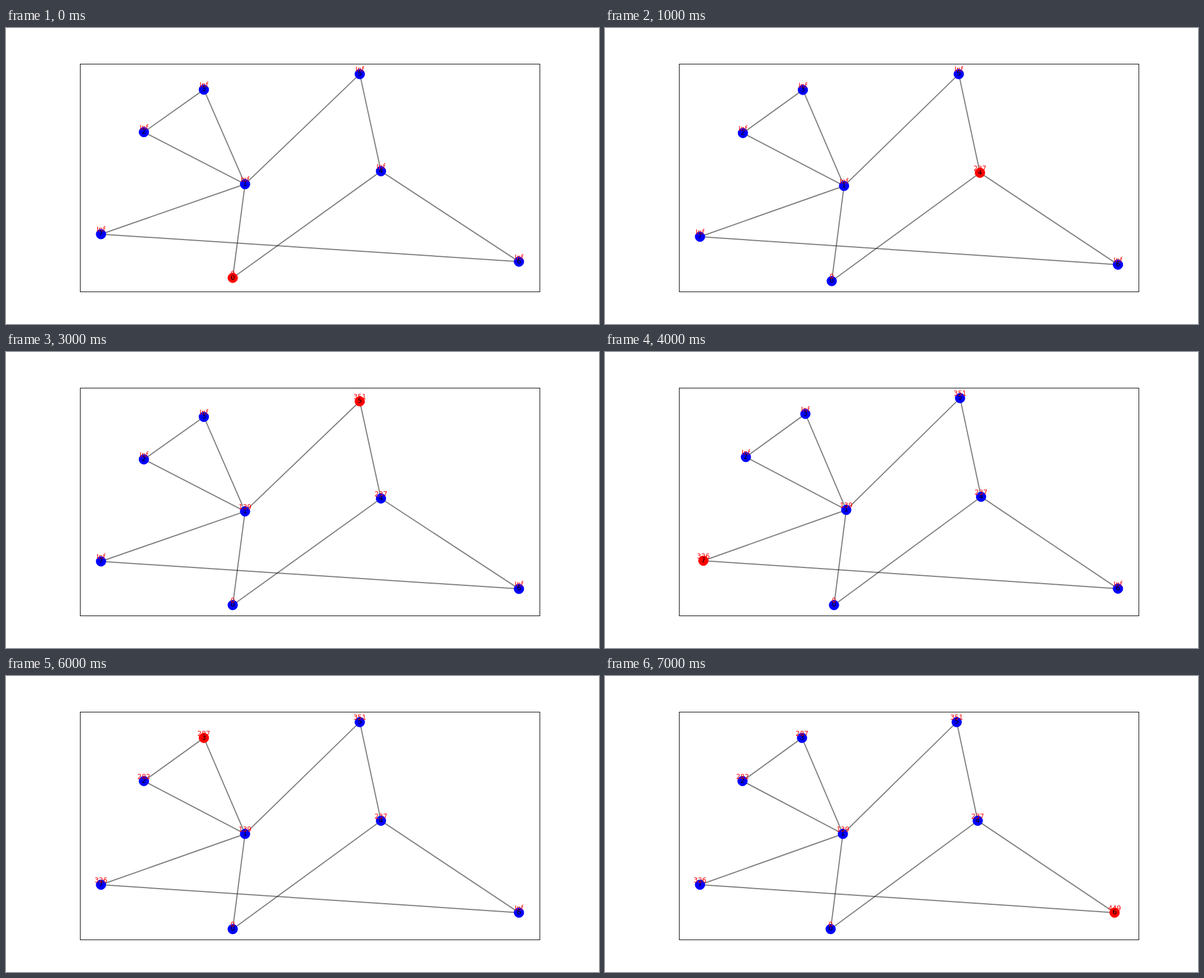
Write an HTML page that moves like this. It is 1058 by 529 pixels and loops after 8000 ms.

```html
<!DOCTYPE html>
<html lang="en">
<head>
<meta charset="utf-8">
<title>Shortest paths</title>
<style>
  html, body { margin: 0; width: 100%; height: 100%; overflow: hidden; background: #fff; }
  svg { display: block; width: 100%; height: 100%; }
  text { font: 12px "DejaVu Sans", sans-serif; text-anchor: middle; }
  line { stroke: #000; stroke-width: 2; stroke-opacity: .5; }
  circle { stroke-width: 1; }
  .frame { fill: none; stroke: #000; }
  .dist { fill: #f00; }
</style>
</head>
<body>
<svg viewBox="0 0 1058 529">
  <rect class="frame" x="132.5" y="64.5" width="820" height="407"/>
</svg>
<script>
  const STEP = 1000;
  const INSET = [6, 5.8];       // how far the axes pull in an active outermost node
  const UNIT = [.668, .813];    // graph units per pixel

  const nodes = [
    [404.5, 452.3], [426.5, 282.2], [246, 187.7], [353, 110.6],
    [669, 258.7], [631.2, 82.4], [915.2, 422.9], [169.5, 373]
  ];
  const edges = "01 04 12 13 15 17 23 45 46 67".split(" ").map(pair => [...pair].map(Number));
  const order = [..."04157236"].map(Number);
  const limits = [0, 1].map(k => {
    const values = nodes.map(p => p[k]);
    return [Math.min(...values), Math.max(...values)];
  });

  const svg = document.querySelector("svg");

  function set(el, attrs) {
    for (const name in attrs) el.setAttribute(name, attrs[name]);
  }

  function add(tag, attrs = {}) {
    const el = document.createElementNS("http://www.w3.org/2000/svg", tag);
    set(el, attrs);
    return svg.appendChild(el);
  }

  const lines = edges.map(() => add("line"));
  const dots = nodes.map(() => add("circle", { r: 8.66 }));
  const ids = nodes.map(() => add("text"));
  const labels = nodes.map(() => add("text", { class: "dist" }));
  ids.forEach((el, i) => el.textContent = i);

  function weight(a, b) {
    const [dx, dy] = UNIT.map((u, k) => u * (nodes[a][k] - nodes[b][k]));
    return Math.round(Math.hypot(dx, dy));
  }

  // Each visited node takes its shortest way through those visited before it.
  const dist = [];
  for (const i of order) {
    const ways = edges.filter(e => e.includes(i))
      .map(([a, b]) => a === i ? b : a)
      .filter(j => j in dist)
      .map(j => dist[j] + weight(i, j));
    dist[i] = ways.length ? Math.min(...ways) : 0;
  }

  // Fit a coordinate on axis k, pulling in the end where the active node lies.
  function fit(v, k, active) {
    const [lo, hi] = limits[k];
    const a = active === lo ? lo + INSET[k] : lo;
    const b = active === hi ? hi - INSET[k] : hi;
    return a + (v - lo) / (hi - lo) * (b - a);
  }

  function draw(step) {
    const active = order[step];
    const pts = nodes.map(p => p.map((v, k) => fit(v, k, nodes[active][k])));
    edges.forEach(([a, b], i) => {
      const [[x1, y1], [x2, y2]] = [pts[a], pts[b]];
      set(lines[i], { x1, y1, x2, y2 });
    });
    pts.forEach(([x, y], i) => {
      const color = i === active ? "#f00" : "#00f";
      set(dots[i], { cx: x, cy: y, fill: color, stroke: color });
      set(ids[i], { x, y: Math.round(y + 3) });
      set(labels[i], { x, y: Math.round(y - 4) });
      labels[i].textContent = order.indexOf(i) <= step ? dist[i] : "Inf";
    });
  }

  let shown = -1;
  const start = performance.now();

  function tick() {
    const step = Math.floor((performance.now() - start) / STEP) % order.length;
    if (step !== shown) draw(shown = step);
    requestAnimationFrame(tick);
  }
  tick();
</script>
</body>
</html>
```
